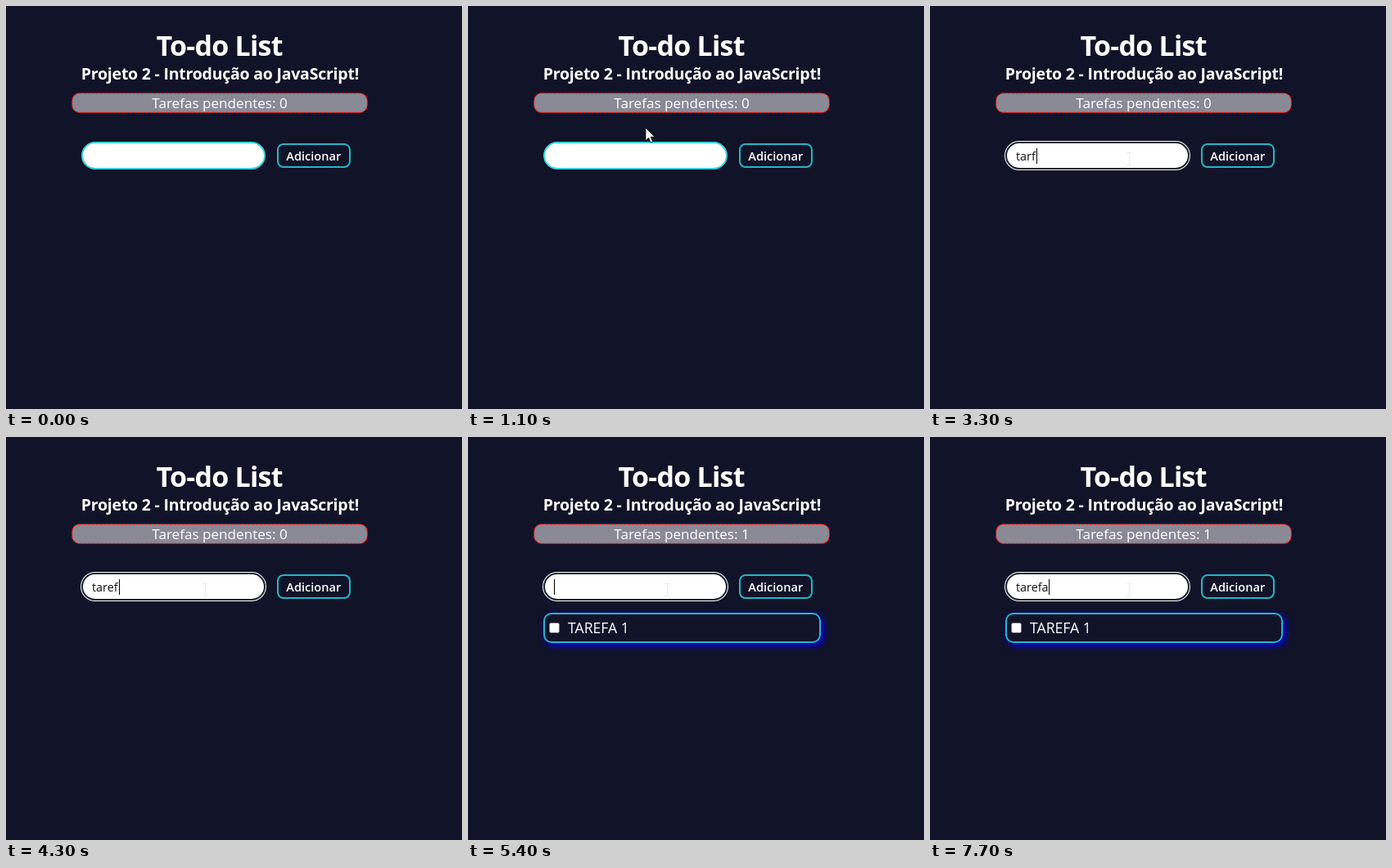
An HTML page that plays this animation: 557x493 px, repeating every 8000 ms.

```html
<!DOCTYPE html>
<html lang="pt">
<head>
<meta charset="utf-8">
<title>To-do List</title>
<style>
  html, body { margin: 0; width: 100%; height: 100%; overflow: hidden; background: #111328; }
  div, svg { position: absolute; box-sizing: border-box; }
  svg { left: 0; top: 0; }
  text { font-family: "Open Sans", "Noto Sans", sans-serif; fill: #fff; white-space: pre; }
  .mid { text-anchor: middle; }
  #field { left: 92px; top: 166px; width: 225px; height: 34px; background: #fff; border: 2px solid #34d2dd; border-radius: 17px; }
  #field.focus { border-color: #14232f; box-shadow: 0 0 0 1px #fff; }
  #add { left: 331px; top: 168px; width: 90px; height: 30px; border: 2px solid #24b6c8; border-radius: 8px; }
  #task { left: 92px; top: 215px; width: 339px; height: 37px; border: 2px solid #24b6d0; border-radius: 10px; box-shadow: 3px 3px 8px blue; }
  #check { left: 5px; top: 10px; width: 13px; height: 13px; background: #fff; border: 1px solid #767676; border-radius: 2.5px; }
</style>
</head>
<body>
<div id="field"></div>
<div id="add"></div>
<div id="task"><div id="check"></div></div>
<svg width="557" height="493">
  <rect x="80.6" y="106.6" width="360.8" height="23.8" rx="9.4" fill="#8a8a96" stroke="red" stroke-width="1.3" stroke-dasharray="3 2"/>
  <text class="mid" x="260.6" y="61" font-size="34" font-weight="700" letter-spacing="-.78">To-do List</text>
  <text class="mid" x="261.4" y="90" font-size="19.5" font-weight="700" letter-spacing="-.23">Projeto 2 - Introdução ao JavaScript!</text>
  <text class="mid" id="count" x="261" y="125" font-size="17.1" font-weight="500"></text>
  <text class="mid" x="375.8" y="189" font-size="14.6" font-weight="600">Adicionar</text>
  <text id="label" x="122" y="240" font-size="17.6" font-weight="500">TAREFA 1</text>
  <text id="typed" x="105" y="189" font-size="14.4" style="fill:#111"></text>
  <rect id="caret" y="174" width="1" height="19" fill="#000"/>
  <path id="arrow" d="M0 0V15.5L3.6 12.2 6.2 18 8.7 16.9 6.2 11.2H11Z" fill="#fff" stroke="#111" stroke-width=".8"/>
  <path id="beam" d="M-3-7.5H3M.5-7V7M-3 7.5H3" fill="none" stroke="#e9e9e9"/>
</svg>
<script>
  const LOOP = 8000, FOCUS = 1800, ADDED = 5400;
  const $ = id => document.getElementById(id);

  // [start, text, caret x or 0 while it is hidden]
  const typing = [
    [0, "", 0], [FOCUS, "", 105], [2300, "", 0],
    [2800, "t", 111], [2900, "ta", 118], [3100, "tar", 124], [3300, "tarf", 130],
    [3800, "tar", 0], [4000, "tare", 132], [4300, "taref", 138], [4400, "tarefa", 145],
    [4900, "tarefa", 0], [5000, "tarefa ", 148], [5200, "tarefa 1", 156],
    [ADDED, "", 105], [5600, "", 0], [6100, "", 105],
    [6400, "t", 111], [6800, "ta", 118], [7100, "tar", 124], [7200, "tare", 132],
    [7500, "taref", 138], [7700, "tarefa", 145]
  ];
  // [start, x, y] of the text pointer
  const beamStops = [[1200, 224, 197], [1300, 238, 197], [1400, 246, 197], [1600, 245, 192], [1700, 244, 189], [1800, 243, 187]];

  const at = (rows, t) => rows.findLast(row => row[0] <= t);
  const show = (id, on) => $(id).style.display = on ? "" : "none";
  const move = (id, x, y) => $(id).setAttribute("transform", `translate(${x} ${y})`);
  const bend = (a, b, c, p) => a * (1 - p) ** 2 + 2 * b * p * (1 - p) + c * p * p;

  function draw(t) {
    const [, text, caretX] = at(typing, t);
    $("typed").textContent = text;
    $("caret").setAttribute("x", caretX);
    show("caret", caretX);
    $("field").classList.toggle("focus", t >= FOCUS);

    const added = t >= ADDED;
    show("task", added);
    show("label", added);
    $("count").textContent = "Tarefas pendentes: " + (added ? 1 : 0);

    // The pointer is sampled ten times a second.
    const p = (Math.floor(t / 100) - 4) / 7;
    show("arrow", p >= 0 && p <= 1);
    move("arrow", bend(273, -10, 217, p), bend(61, 100, 149, p));

    const stop = at(beamStops, t);
    show("beam", stop);
    if (stop) move("beam", stop[1], stop[2]);
  }

  const start = performance.now();
  function tick() {
    draw((performance.now() - start) % LOOP);
    requestAnimationFrame(tick);
  }
  tick();
</script>
</body>
</html>
```
